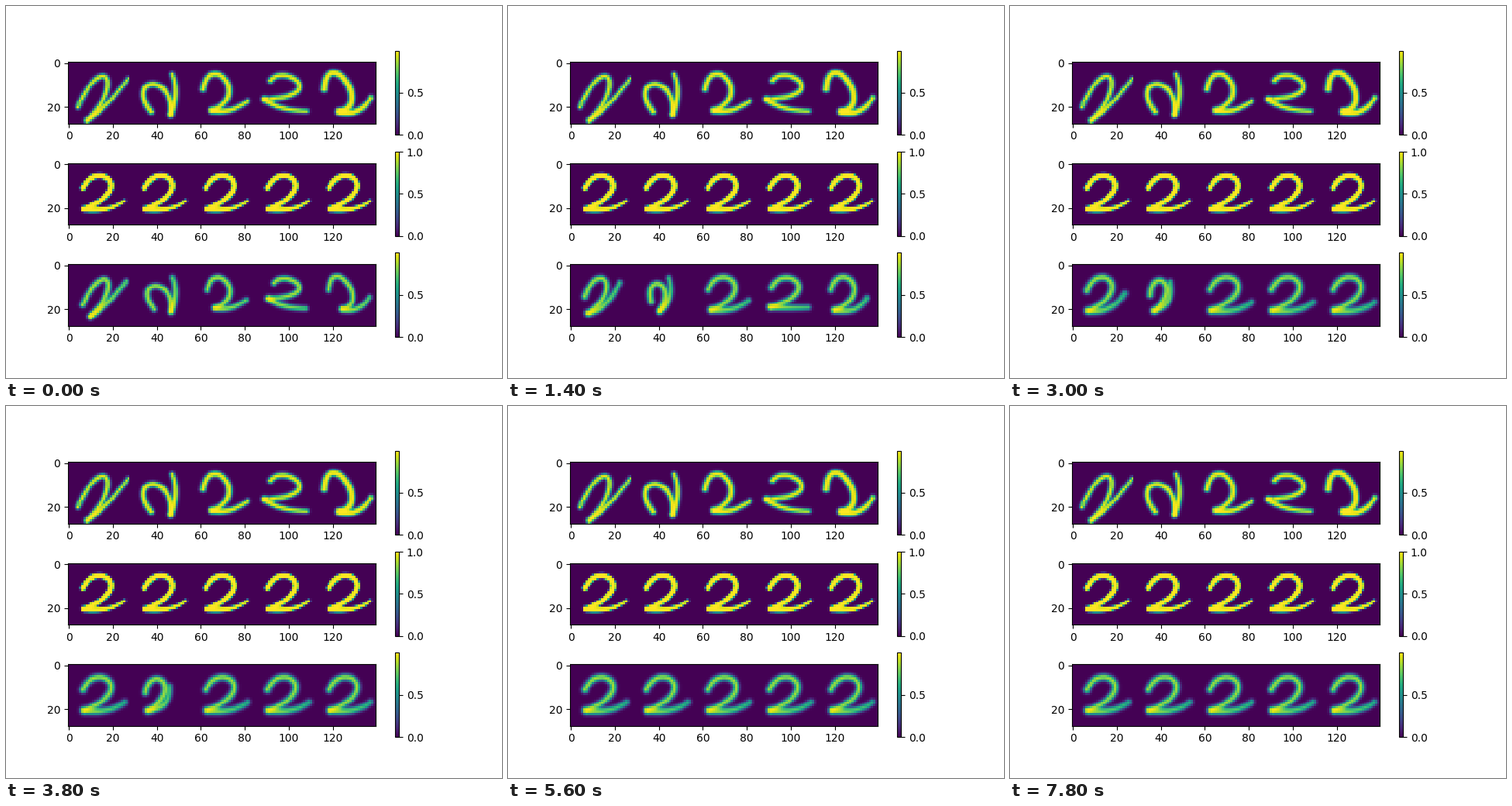
A matplotlib script for the animation above (8000 ms loop, 640 by 480 pixels).

```python
import numpy as np
import matplotlib.pyplot as plt
from matplotlib.animation import FuncAnimation

FRAMES, STEP = 40, 200
CELL = 28
YY, XX = np.mgrid[0:CELL, 0:CELL]


class Digit:
    """A "2" given by start, top, right side, cusp, mid foot and foot end."""

    def __init__(self, *knots, radius=1.2, secs=0, squeeze=0):
        self.knots = np.array(knots, float)
        self.radius = radius
        self.secs = secs
        self.squeeze = squeeze


TEMPLATE = Digit((6.3, 11.1), (14.5, 5.5), (19, 10.8),
                 (6.8, 20.4), (17, 20.3), (25.2, 16.7))
DIGITS = [
    Digit((4.1, 19.7), (14, 6.3), (17.4, 11), (8.2, 26), (17.4, 18.2), (26.8, 7.2),
          radius=1.05, secs=3.6, squeeze=.2),
    Digit((9.3, 22), (6.6, 11.2), (14, 11), (18.2, 23.3), (20.4, 13.5), (18.9, 5.2),
          radius=1.2, secs=5.4, squeeze=.28),
    Digit((4.9, 11.8), (11.5, 5.2), (16.8, 12), (9.1, 21.4), (17, 21.3), (25.2, 17.2),
          radius=1.25, secs=2.4),
    Digit((7.6, 8), (16.5, 6.3), (20.5, 11.8), (4.8, 16.4), (13, 20.3), (24.2, 21.7),
          radius=1.15, secs=2.6),
    Digit((4, 11.7), (10, 4.9), (16.4, 13.5), (11, 22), (19, 21.7), (25.4, 15.7),
          radius=1.45, secs=2.6, squeeze=.12),
]


def curve(pts, n=60):
    """Polynomial through evenly timed points."""
    size = len(pts)
    coef = np.polyfit(np.linspace(0, 1, size), pts, size - 1)
    return np.vander(np.linspace(0, 1, n), size) @ coef


def brush(pts, radius, soft, gain):
    """Soft stroke; radius and gain run from a first to a last value."""
    c = curve(pts)[:, :, None, None]
    r, g = (np.linspace(a, b, len(c))[:, None, None] for a, b in (radius, gain))
    d = np.hypot(XX - c[:, 0], YY - c[:, 1])
    return (g / (1 + np.exp((d - r) / soft))).max(axis=0)


def draw(knots, radius, soft, gain=1.0, tail=.75, fade=1.0):
    bowl = brush(knots[:4], (radius, radius), soft, (gain, gain))
    foot = brush(knots[3:], (radius * 1.1, radius * tail), soft, (gain, gain * fade))
    return 1 - (1 - bowl) * (1 - foot)


def warp(digit, sec):
    """The bowl eases out toward the template while the foot end lags."""
    u = min(1, sec / digit.secs)
    lead, lag = 1 - (1 - u) ** 1.6, u ** 3
    rate = np.array([lead] * 4 + [(lead + lag) / 2, lag])[:, None]
    first = digit.knots * (.87, .84) + (2.6, 1.3)
    knots = first + (TEMPLATE.knots - first) * rate
    knots[:, 0] -= (knots[:, 0] - 6) * digit.squeeze * np.sin(np.pi * u)
    return draw(knots, 1.15 + .12 * u, .32 + .08 * u, .9, .85, .9 - .15 * u)


def warped(frame):
    return np.hstack([warp(d, frame * STEP / 1000) for d in DIGITS])


inputs = np.hstack([draw(d.knots, d.radius, .3) for d in DIGITS])
templates = np.hstack([draw(TEMPLATE.knots, 1.25, .13, tail=.5)] * len(DIGITS))

fig, axes = plt.subplots(3, 1, figsize=(6.4, 4.8), dpi=100)
images = []
for ax, data, top in zip(axes, (inputs, templates, warped(0)), (.996, 1, .996)):
    images.append(ax.imshow(data, cmap="viridis", vmin=0, vmax=top,
                            interpolation="nearest"))
    fig.colorbar(images[-1], ax=ax)


def update(frame):
    images[2].set_data(warped(frame))
    return images[2:]


anim = FuncAnimation(fig, update, frames=FRAMES, interval=STEP,
                     repeat=True, repeat_delay=0, blit=False)
plt.show()
```
